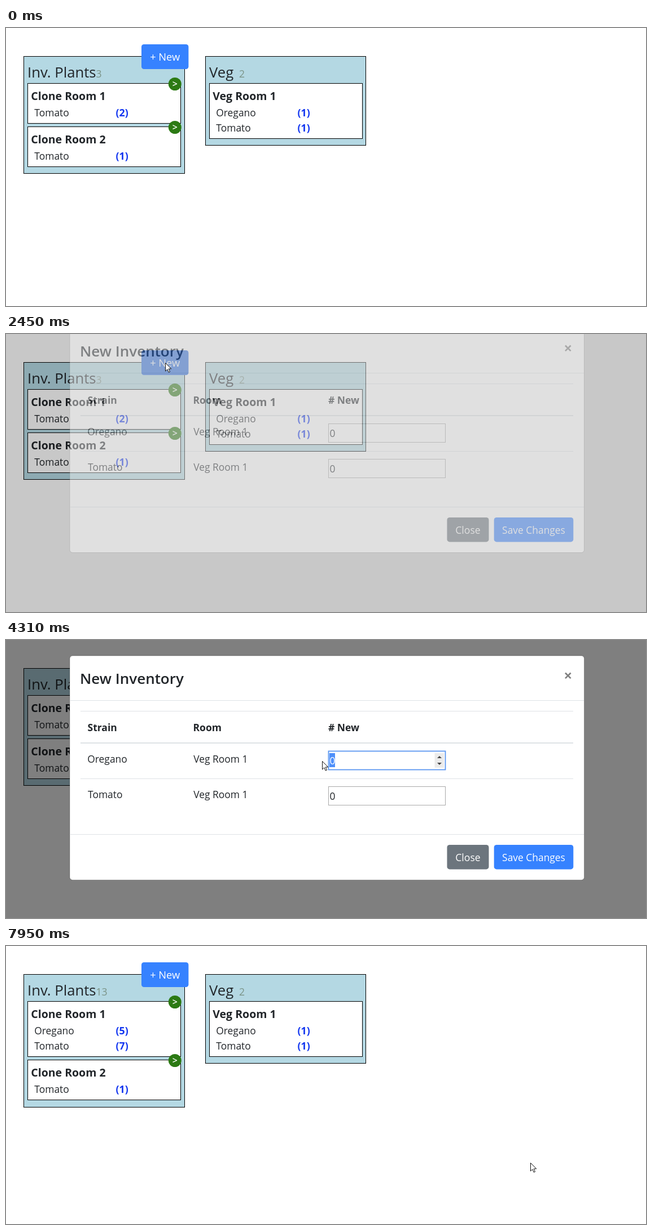
Write an HTML page that moves like this. It is 1134 px wide and 494 px high and loops after 8 s.

```html
<!DOCTYPE html>
<html lang="en">
<head>
<meta charset="utf-8">
<title>Plant inventory</title>
<style>
  html, body { margin: 0; width: 100%; height: 100%; overflow: hidden; background: #fff; }
  svg { display: block; font-family: "Open Sans", "Noto Sans", sans-serif; }
</style>
</head>
<body>
<svg id="stage" width="1134" height="494" viewBox="0 0 1134 494"></svg>
<script>
const stage = document.getElementById('stage');
const LOOP = 8000, INK = '#212529', BLUE = '#3682ff', HOVER = '#2c6fe0', ACTIVE = '#2966c9';

// Pointer moves: start, end, number of positions, from x, y, to x, y
const moves = [
  [440, 1210, 11, 1014, 478, 286, 57],
  [1290, 1350, 2, 281, 46, 278, 38],
  [1670, 1820, 3, 279, 44, 282, 51],
  [3070, 3610, 8, 291, 57, 588, 217],
  [3760, 3930, 3, 586, 217, 553, 216],
  [4000, 4070, 2, 560, 215, 566, 215],
  [4240, 4310, 2, 563, 215, 560, 215],
  [5230, 5700, 7, 562, 220, 580, 282],
  [5770, 6000, 4, 583, 280, 585, 273],
  [6090, 6330, 4, 579, 272, 539, 268],
  [7100, 7480, 6, 545, 271, 929, 385]
];
const opening = [2450, 2520, 2600, 2690];

const text = (x, y, s, size = 17.4, fill = INK, extra = '') =>
  `<text x="${x}" y="${y}" font-size="${size}" fill="${fill}" ${extra}>${s}</text>`;
const bold = (x, y, s, size = 17.5, fill = INK) => text(x, y, s, size, fill, 'font-weight="700"');
const rect = (x, y, w, h, fill, extra = '') =>
  `<rect x="${x}" y="${y}" width="${w}" height="${h}" fill="${fill}" ${extra}/>`;
const inside = (p, x, y, w, h) => p && p.x >= x && p.x <= x + w && p.y >= y && p.y <= y + h;

function pointer(t) {
  const m = moves.filter(m => t >= m[0]).pop();
  if (!m) return null;
  const [a, b, n, x0, y0, x1, y1] = m;
  const k = Math.min(n - 1, Math.floor((t - a) / (b - a) * (n - 1) + 1e-6)) / (n - 1);
  const e = n > 4 ? k * k * (3 - 2 * k) : k;
  return { x: x0 + (x1 - x0) * e, y: y0 + (y1 - y0) * e };
}

function button(x, y, w, h, label, fill, size) {
  return rect(x, y, w, h, fill, 'rx="4.5"') +
    text(x + w / 2, y + 29.3, label, size, '#fff', 'text-anchor="middle"');
}

function card(x, y, title, rows, arrow) {
  let s = rect(x, y, 271, 44 + 27 * rows.length, '#fff', 'stroke="#000"') +
    bold(x + 5.8, y + 29.3, title, 19.5);
  rows.forEach(([name, count], i) => {
    const base = y + 58 + 27.3 * i;
    s += text(x + 11.8, base, name) + bold(x + 156, base, `(${count})`, 17.8, '#1236f0');
  });
  if (arrow) s += `<circle cx="${x + 260.8}" cy="${y + 1}" r="11.5" fill="#2c7a14"/>` +
    text(x + 260.8, y + 6.6, '&gt;', 16, '#fff', 'text-anchor="middle" font-weight="600"');
  return s;
}

function panel(x, w, h, title, count, countX) {
  return rect(x, 50.5, w, h, '#b4d8e3', 'stroke="#000"') +
    text(x + 6.5, 88, title, 25.7) + text(countX, 88, count, 17.6, '#7b9488');
}

function page(t, p) {
  const done = t >= 7950, shift = done ? 27 : 0;
  const pressed = t >= 2220 && t < 2450;
  const over = t < 2690 && inside(p, 240, 29, 83, 44);
  const fill = pressed ? ACTIVE : over ? HOVER : BLUE;
  const rows = done ? [['Oregano', 5], ['Tomato', 7]] : [['Tomato', 2]];
  const ring = pressed ? rect(238.2, 27.2, 87, 47.6, 'none',
    `rx="6" stroke="${BLUE}" stroke-width="3.6" stroke-opacity="${0.5 * Math.min(1, (t - 2220) / 150)}"`) : '';
  return panel(31.5, 285, done ? 236 : 208, 'Inv. Plants', done ? 13 : 3, 159.5) +
    card(38.5, 98.5, 'Clone Room 1', rows, true) +
    card(38.5, 175.5 + shift, 'Clone Room 2', [['Tomato', 1]], true) +
    panel(353.5, 284, 158, 'Veg', 2, 413) +
    card(360.5, 98.5, 'Veg Room 1', [['Oregano', 1], ['Tomato', 1]]) +
    ring + button(240, 29, 83.4, 44, '+ New', fill, 18.3);
}

// Number field with focus border, selection, caret and spinner
function field(y, t, p, focusAt, selectAt, typeAt, blurAt) {
  const focus = t >= focusAt && t < blurAt;
  const selected = t >= selectAt && t < typeAt;
  const over = t > 2690 && inside(p, 571, y, 208, 34);
  let s = rect(571.5, y, 207, 33, '#fff', focus ? 'stroke="#5a96f0" stroke-width="1.8"' : 'stroke="#a9a9a9"');
  if (focus || over) s += rect(759.5, y + 3.5, 16.5, 26, '#ebebeb') +
    `<path d="M764 ${y + 12.5}l4 -4 4 4zM764 ${y + 20.5}l4 4 4 -4z" fill="#444"/>`;
  if (selected) s += rect(573, y + 3.5, 10, 25, '#4f90fa');
  s += text(573.4, y + 23.2, t >= typeAt ? 5 : 0, 17.4, selected ? '#fff' : INK);
  if (focus && t >= typeAt && Math.floor((t - typeAt) / 535) % 2 === 0)
    s += rect(582, y + 3.5, 1, 25, '#000');
  return s;
}

function dialog(t, p) {
  const line = (x, y, w, h = 1) => rect(x, y, w, h, '#dee2e6');
  const save = inside(p, 865, 364, 140, 43) ? HOVER : BLUE;
  return rect(113, 28, 911.5, 398.5, '#fff', 'rx="5" stroke="#000" stroke-opacity=".25"') +
    text(131, 77.5, 'New Inventory', 26, INK, 'font-weight="600"') +
    '<path d="M991 58.5l9.6 9.6m0 -9.6l-9.6 9.6" stroke="#7f7f7f" stroke-width="2.7"/>' +
    line(113.5, 107, 910.5) + line(132, 126, 873) + line(132, 182, 873, 2) +
    line(132, 246, 873) + line(113.5, 345, 910.5) +
    bold(144.5, 161.5, 'Strain') + bold(331.5, 161.5, 'Room') + bold(571, 161.5, '# New') +
    text(144.3, 218.4, 'Oregano') + text(332.2, 218.4, 'Veg Room 1') +
    text(145, 281.4, 'Tomato') + text(332.2, 281.4, 'Veg Room 1') +
    field(197.5, t, p, 3760, 3840, 5000, 6000) +
    field(260.5, t, p, 6000, 6170, 6640, LOOP) +
    button(781.5, 364, 74, 43.4, 'Close', '#6c757d', 17.6) +
    button(864.7, 364, 140.6, 43.4, 'Save Changes', save, 17.4);
}

function overlay(t, p) {
  if (t < opening[0] || t >= 7950) return '';
  const age = t >= 7880 ? 66 : opening.filter(s => t >= s).pop() - 2385;
  const show = Math.min(1, age / 150);
  const left = Math.pow(1 - Math.min(1, age / 300), 1.6);
  return rect(0, 0, 1134, 494, '#000', `opacity="${show / 2}"`) +
    `<g opacity="${show}" transform="translate(0 ${Math.round(-56 * left)})">${dialog(t, p)}</g>`;
}

function cursor(t, p) {
  if (!p) return '';
  const beam = t >= 3070 && (t < 3150 || inside(p, 571, 197, 208, 34) || inside(p, 571, 260, 208, 34));
  const d = beam
    ? 'M-3 -7.5h2.2l.8 .8 .8 -.8h2.2M0 -6.7V6.7M-3 7.5h2.2l.8 -.8 .8 .8h2.2'
    : 'M.5 .5v14.5l3.4 -3.2 2.3 5.3 2.3 -1 -2.3 -5.2h4.6z';
  return `<path transform="translate(${p.x} ${p.y})" d="${d}" fill="${beam ? 'none' : '#fff'}" stroke="#111"/>`;
}

let last = '';
function frame(now) {
  const t = now % LOOP, p = pointer(t);
  const scene = page(t, p) + overlay(t, p) + cursor(t, p);
  if (scene !== last) stage.innerHTML = last = scene;
  requestAnimationFrame(() => frame(performance.now()));
}
frame(0);
</script>
</body>
</html>
```
